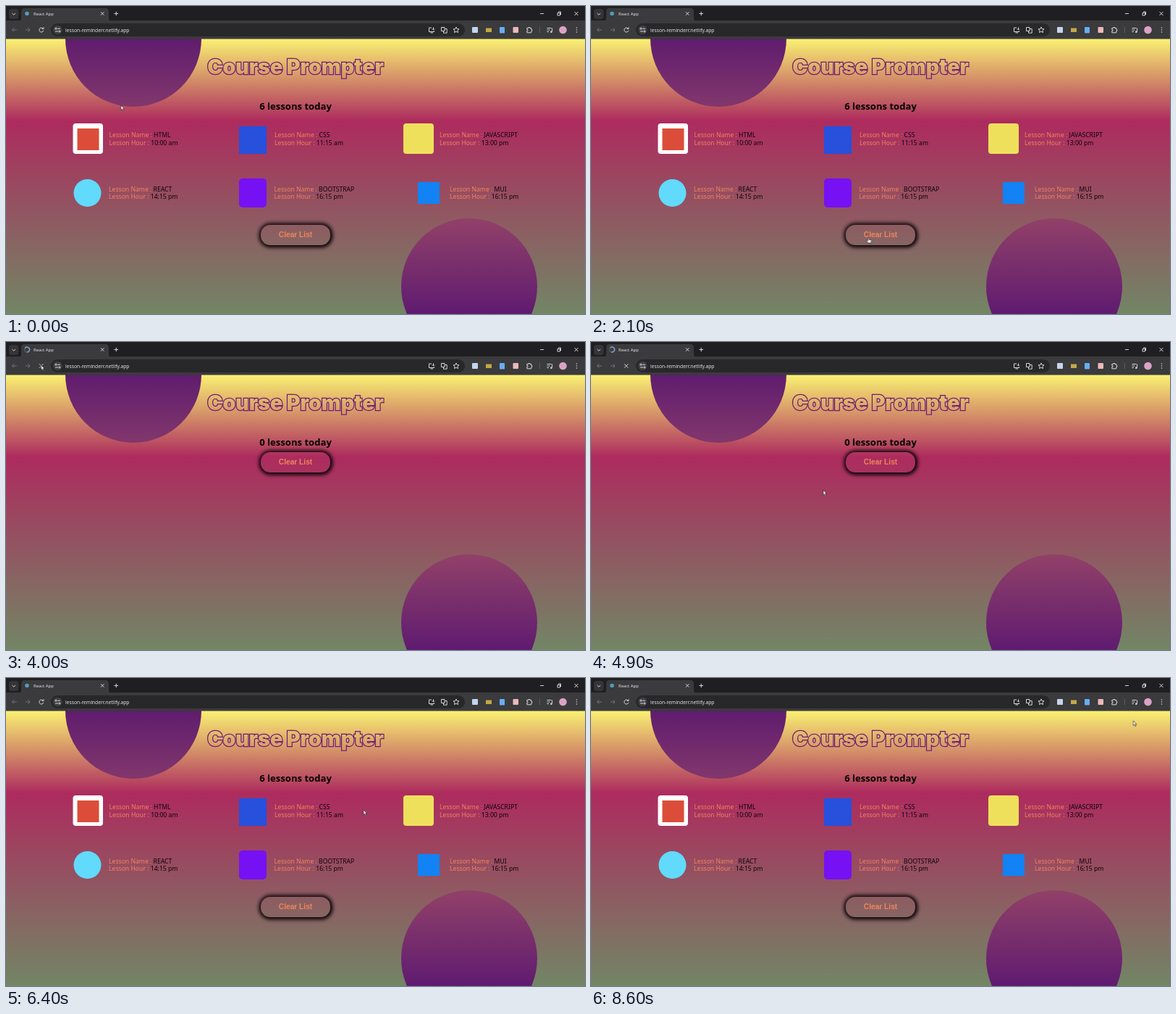
Write an HTML page that moves like this. It is 800 px wide and 425 px high and loops after 8.7 s.

```html
<!DOCTYPE html>
<html lang="en">
<head>
<meta charset="utf-8">
<title>React App</title>
<style>
  html, body { margin: 0; width: 100%; height: 100%; overflow: hidden; background: #1f1f22; }
  #stage { position: absolute; left: 0; top: 0; width: 800px; height: 425px; overflow: hidden; }
  #stage > svg { position: absolute; left: 0; top: 0; }
  text { font-family: "Noto Sans", sans-serif; white-space: pre; }
  .title {
    font: 900 28.5px Inter, sans-serif; text-anchor: middle;
    fill: url(#page); stroke: #6b1d74; stroke-width: 2.4px; paint-order: stroke;
  }
  .count { font-size: 13.1px; font-weight: 600; text-anchor: middle; }
  .lesson text { font-size: 8.65px; fill: #0c0508; }
  .lesson .label { fill: #f0855c; }
  .line { fill: none; stroke: #d6d6d8; stroke-width: 1; }
  .dim { stroke: #747477; }
  .divider { stroke: #5a5a5e; }
  #clear {
    position: absolute; left: 352px; top: 302px; width: 96px; height: 28px;
    border-radius: 13px; box-shadow: .5px .5px 5px 3px #0c0508;
    font: bold 10.2px/28px "Liberation Sans", Arial, sans-serif;
    color: #f0855c; text-align: center;
  }
</style>
</head>
<body>
<div id="stage">
  <svg width="800" height="425" viewBox="0 0 800 425">
    <defs>
      <linearGradient id="page" gradientUnits="userSpaceOnUse" x1="0" x2="0" y1="45" y2="425">
        <stop stop-color="#faf172"/><stop offset=".3" stop-color="#ad2b5e"/><stop offset="1" stop-color="#728665"/>
      </linearGradient>
      <linearGradient id="upper" gradientUnits="userSpaceOnUse" x1="0" x2="0" y1="45" y2="139">
        <stop stop-color="#601c6e"/><stop offset="1" stop-color="#82376c"/>
      </linearGradient>
      <linearGradient id="lower" gradientUnits="userSpaceOnUse" x1="0" x2="0" y1="293" y2="425">
        <stop stop-color="#924168"/><stop offset="1" stop-color="#5f1b70"/>
      </linearGradient>
    </defs>

    <rect y="45" width="800" height="380" fill="url(#page)"/>
    <circle cx="176" cy="45" r="94" fill="url(#upper)"/>
    <circle cx="640" cy="387" r="94" fill="url(#lower)"/>
    <text class="title" x="400" y="94">Course Prompter</text>

    <g id="full">
      <text class="count" x="400" y="142.500">6 lessons today</text>
      <g id="lessons"></g>
    </g>
    <text id="empty" class="count" x="400" y="142.500">0 lessons today</text>

    <!-- browser bars -->
    <rect width="800" height="21" fill="#1f1f22"/>
    <rect y="20" width="800" height="25.500" fill="#3b3a3d"/>
    <rect x="4" y="4" width="13.500" height="14" rx="4" fill="#353538"/>
    <path class="line" d="M8.500 10l2.300 2.200 2.300-2.200"/>
    <path d="M17 21q4 0 4-4V8q0-5 5-5h111q5 0 5 5v9q0 4 4 4z" fill="#3b3a3d"/>
    <text x="38" y="12.700" font-size="5.900" fill="#e6e6e8">React App</text>
    <path class="line" d="M131 8.300l4.400 4.400m0-4.400l-4.400 4.400M149.500 10.500h5.500m-2.750-2.750v5.500"/>
    <path class="line" d="M738 10.500h5M785.500 8l5 5m0-5l-5 5M762 9.500h3.500V13H762zM763 8h3.500v4"/>

    <path class="line dim" d="M14.500 33h-6m2.700-2.700L8.500 33l2.700 2.700M27 33h6m-2.700-2.700L33 33l-2.700 2.700"/>
    <path id="reload" class="line" d="M51.300 31.200a3 3 0 1 0 .5 2.600M52 29.300v2.300h-2.300"/>
    <path id="stop" class="line" d="M46 30.300l5.400 5.400m0-5.400L46 35.700"/>
    <rect x="62" y="24" width="572" height="18" rx="9" fill="#28282b"/>
    <circle cx="71.300" cy="33" r="6.300" fill="#3f3f43"/>
    <circle id="tuneHover" cx="71.300" cy="33" r="6.300" fill="#55555a"/>
    <path class="line" d="M71 31.200h4M68 35h4"/>
    <circle class="line" cx="69" cy="31.200" r="1.100"/><circle class="line" cx="74" cy="35" r="1.100"/>
    <text x="82" y="35.500" font-size="6.740" fill="#e3e3e5">lesson-reminderr.netlify.app</text>

    <path class="line" d="M588 30h-3.500v5.500h7V34M586.500 37h3.500M590.500 29.500v3.500m-1.500-1.500l1.500 1.500 1.500-1.500"/>
    <path class="line" d="M601.500 29.500h4.500v5h-4.500zM606 31.500h3.200v5.700h-4.700v-2.700"/>
    <path class="line" d="M622 29l1.200 2.600 2.800.3-2.100 1.900.6 2.800-2.500-1.400-2.500 1.400.6-2.800-2.100-1.900 2.800-.3z"/>
    <rect x="644" y="29" width="8" height="8" rx="1" fill="#c3d6ec"/>
    <rect x="663" y="30.500" width="8" height="5.500" fill="#c5a742"/>
    <rect x="682" y="29" width="7" height="8.500" rx="1" fill="#66aef2"/>
    <rect x="700.500" y="29" width="7.500" height="8" rx="1" fill="#eab9b9"/>
    <path class="line" d="M719.800 30.500h2v-1h2v1h2v2h1v2h-1v2.300h-6v-2.300h1v-2h-1z"/>
    <path class="line divider" d="M737.500 29v8"/>
    <path class="line" d="M747.500 30.500h6M747.500 33h4M747.500 35.500h2.500M754.500 30.500v5"/>
    <circle cx="753.300" cy="35.700" r="1.300" fill="#d6d6d8"/>
    <circle cx="769.500" cy="33" r="5.300" fill="#dba3c5"/>
    <path d="M788.500 30v.01M788.500 33v.01M788.500 36v.01" stroke="#d6d6d8" stroke-width="1.500" stroke-linecap="round"/>

    <circle id="favicon" cx="29" cy="10.500" r="2.800" fill="#4d9fb4"/>
    <g id="loading">
      <circle class="line" cx="29" cy="10.500" r="3.500" style="stroke:#62676d"/>
      <circle id="spinner" cx="29" cy="10.500" r="3.500" fill="none" stroke="#8dbdf3" stroke-width="1.200" stroke-dasharray="14 8"/>
    </g>
  </svg>

  <div id="clear">Clear List</div>

  <svg width="800" height="425" viewBox="0 0 800 425">
    <g id="cursor" stroke="#111" stroke-width=".6" fill="#fff">
      <path id="arrow" d="M0 0v6.500l1.500-1.300 1.100 2.500 1.200-.5-1.100-2.500H4.600z"/>
      <path id="hand" d="M-.8.700q.8-1.200 1.600 0v2.700l2.500.6q.9.300.7 1.300L3.400 8H-.3l-2.500-3q0-1 1-.6l1 .7z"/>
    </g>
  </svg>
</div>

<script>
const LOOP = 8700, TICK = 100;
const CLEARED = 2700, RELOAD = 3700, LOADED = 5700;
const $ = id => document.getElementById(id);

// name, hour, text x, first baseline, icon
const lessons = [
  ["HTML", "10:00 am", 142.5, 181, '<rect x="92.500" y="162" width="41.500" height="42" rx="4" fill="#fff"/><rect x="98.500" y="169" width="30" height="30" fill="#db4d39"/>'],
  ["CSS", "11:15 am", 371, 181, '<rect x="322" y="166" width="38" height="38" fill="#2750dc"/>'],
  ["JAVASCRIPT", "13:00 pm", 599, 181, '<rect x="549" y="162" width="42" height="42" rx="4" fill="#efe05b"/>'],
  ["REACT", "14:15 pm", 142, 255.5, '<circle cx="112.500" cy="258" r="19" fill="#61dafb"/>'],
  ["BOOTSTRAP", "16:15 pm", 370.5, 255.5, '<rect x="322" y="238" width="38" height="40" rx="5" fill="#7611f3"/>'],
  ["MUI", "16:15 pm", 613, 255.5, '<rect x="569" y="243" width="30" height="30" fill="#1282f5"/>']
];
const row = (label, value, x, y) =>
  `<text x="${x}" y="${y}"><tspan class="label">${label} : </tspan>${value}</text>`;
$("lessons").innerHTML = lessons.map(([name, hour, x, y, icon]) =>
  `<g class="lesson">${icon}${row("Lesson Name", name, x, y)}${row("Lesson Hour", hour, x, y + 10.7)}</g>`).join("");

const timing = { duration: LOOP, iterations: Infinity };

// Moves between [time, x, y] points in steps of one tick.
function move(id, points) {
  const end = [LOOP, ...points.at(-1).slice(1)];
  const all = [...points, end];
  $(id).animate(all.map(([t, x, y], i) => ({
    offset: t / LOOP,
    transform: `translate(${x}px, ${y}px)`,
    easing: i < points.length ? `steps(${Math.round((all[i + 1][0] - t) / TICK)}, end)` : "linear"
  })), timing);
}

// Shows a part only inside (or, inverted, outside) a span of time.
function show(id, from, to, inverted = false) {
  const state = on => ({ visibility: on !== inverted ? "visible" : "hidden", easing: "step-end" });
  $(id).animate([
    { offset: 0, ...state(false) },
    { offset: from / LOOP, ...state(true) },
    { offset: to / LOOP, ...state(false) },
    { offset: 1, ...state(false) }
  ], timing);
}

move("cursor", [
  [0, 158.8, 137], [1000, 159, 137.5], [1100, 205, 195], [1200, 285, 300], [1500, 285, 300],
  [1600, 323.5, 329.5], [1700, 340, 328], [1800, 340, 328], [2200, 398, 316], [3000, 398, 316],
  [3100, 65.2, 33], [3500, 48.5, 32], [4500, 48.5, 32], [4600, 90, 52], [4900, 321, 204.5],
  [5400, 350, 212], [5600, 350, 212], [6400, 494, 182], [6500, 506, 177], [6700, 570, 145],
  [6800, 570, 145], [6900, 625, 112], [7000, 625, 112], [7100, 685, 84], [7300, 685, 84],
  [7400, 735, 64], [7800, 735, 64], [7900, 749.3, 59]
]);
move("clear", [[0, 0, 0], [CLEARED - TICK, 0, 0], [CLEARED, 0, -150], [LOADED - TICK, 0, -150], [LOADED, 0, 0]]);

show("full", CLEARED, LOADED, true);
show("empty", CLEARED, LOADED);
show("arrow", 1900, CLEARED, true);
show("hand", 1900, CLEARED);
show("tuneHover", 3100, 3200);
show("reload", RELOAD, LOADED, true);
show("stop", RELOAD, LOADED);
show("favicon", RELOAD, LOADED, true);
show("loading", RELOAD, LOADED);

$("spinner").style.transformOrigin = "29px 10.5px";
$("spinner").animate(
  { transform: ["rotate(0deg)", "rotate(3600deg)"] },
  { ...timing, easing: `steps(${LOOP / TICK}, end)` }
);
</script>
</body>
</html>
```
